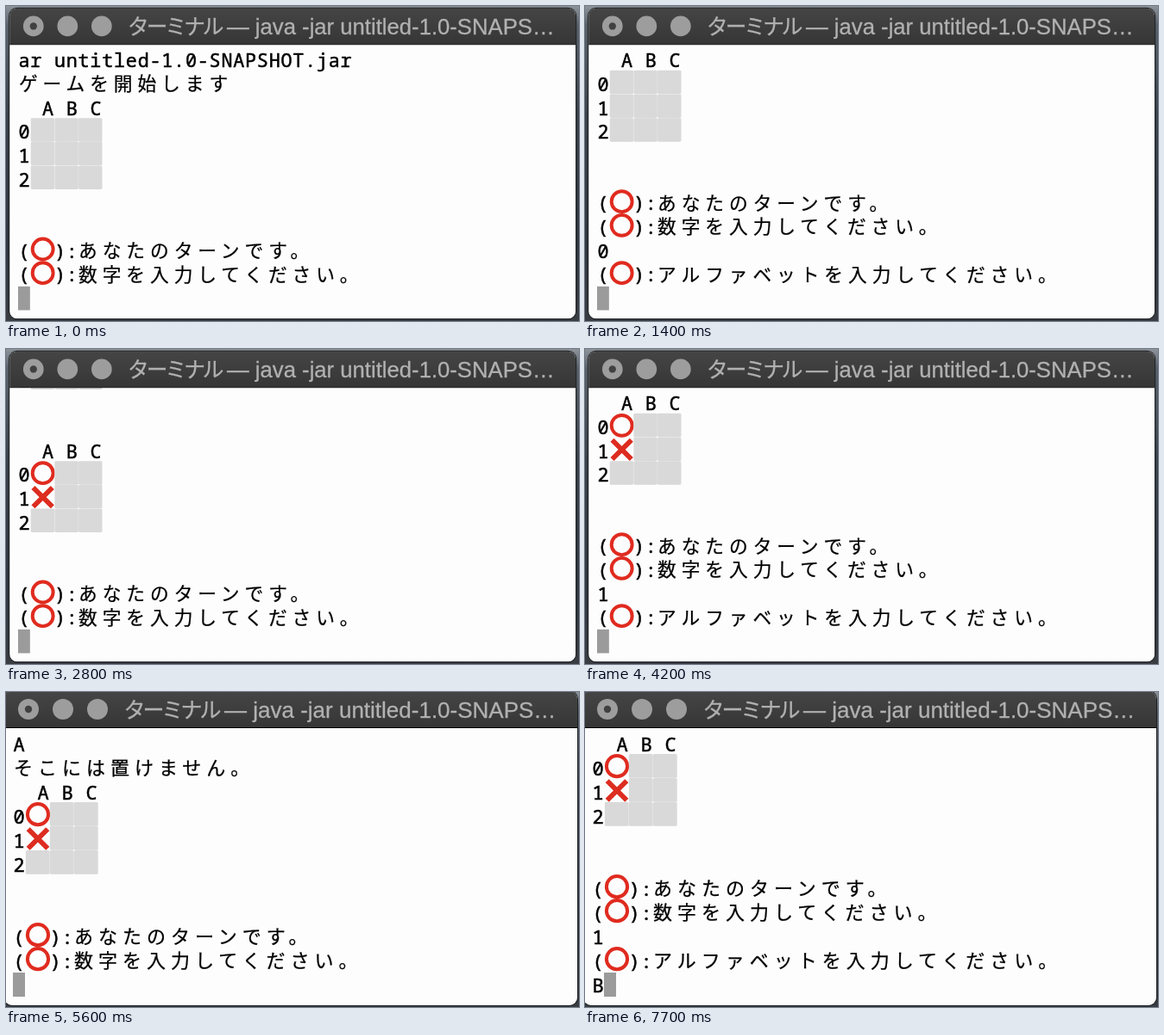
Write an HTML page that moves like this. It is 664 by 366 pixels and loops after 8 s.

```html
<!DOCTYPE html>
<html lang="ja">
<head>
<meta charset="utf-8">
<title>Terminal tic-tac-toe</title>
<style>
  html, body { margin: 0; width: 100%; height: 100%; overflow: hidden; }
  body { background: linear-gradient(#8d9399, #59616b 6%, #39414b 35%, #2f363f 75%, #393d42); }
  svg { display: block; width: 664px; height: 366px; }
  .mono { font: 500 22px "Noto Sans Mono", "DejaVu Sans Mono", monospace; letter-spacing: .8px; stroke: #000; stroke-width: .5px; }
  .kana { font: 400 22px "Noto Sans CJK JP", "Noto Sans CJK", sans-serif; letter-spacing: 6px; stroke: #000; stroke-width: .25px; }
  .title { font: 26px "Liberation Sans", Arial, sans-serif; fill: #b1b1b1; stroke: #b1b1b1; stroke-width: .3px; }
  .title .ja { font: 25px "Noto Sans CJK JP", "Noto Sans CJK", sans-serif; letter-spacing: -3px; }
</style>
</head>
<body>
<svg viewBox="0 0 664 366">
  <defs>
    <linearGradient id="bar" x2="0" y2="1">
      <stop stop-color="#454545"/>
      <stop offset="1" stop-color="#363636"/>
    </linearGradient>
    <rect id="shape" x="-2" y="-1" width="664" height="365" rx="9"/>
    <clipPath id="frame"><use href="#shape"/></clipPath>
    <rect id="empty" x=".9" y="-2" width="27.8" height="27.8" rx="1.5" fill="#d9d9d9"/>
    <circle id="ring" cx="15" cy="12.2" r="12.1" fill="none" stroke="#e02b1f" stroke-width="4"/>
    <path id="cross" d="M3.7 1.2 26.3 23.8M26.3 1.2 3.7 23.8" stroke="#dd2c20" stroke-width="5.8"/>
    <rect id="cursor" width="14" height="28" fill="#9b9b9b"/>
  </defs>
  <g id="window">
    <use href="#shape" fill="none" stroke="#1c1f22" stroke-width="2"/>
    <g clip-path="url(#frame)">
      <rect x="-2" y="-1" width="664" height="365" fill="#fdfdfd"/>
      <g id="screen"></g>
      <rect x="-2" y="-1" width="664" height="42" fill="url(#bar)"/>
      <rect x="-2" y="41" width="664" height="1"/>
      <g fill="#9d9d9d">
        <circle cx="26" cy="20" r="12"/>
        <circle cx="66" cy="20" r="12"/>
        <circle cx="106" cy="20" r="12"/>
      </g>
      <circle cx="26" cy="20" r="4.2" fill="#414141"/>
      <text class="title" y="30"><tspan class="ja" x="136.5">ターミナル</tspan><tspan x="253">— java -jar untitled-1.0-SNAPS…</tspan></text>
    </g>
  </g>
</svg>
<script>
const NS = 'http://www.w3.org/2000/svg';
const CELL = 14, ROW = 28, LEFT = 8, LAST_TOP = 326, STEP = 700, LOOP = 8000;
const ICONS = { '□': 'empty', '○': 'ring', '×': 'cross', '█': 'cursor' };
const view = document.getElementById('window');
const rows = document.getElementById('screen');

const board = (a, b, c) => ['  A B C', '0' + a, '1' + b, '2' + c, '', ''];
const fresh = board('□□□', '□□□', '□□□');
const played = board('○□□', '×□□', '□□□');
const askRow = ['(○):あなたのターンです。', '(○):数字を入力してください。'];
const askCol = '(○):アルファベットを入力してください。';

const rowInput = (head, typed = '') => [...head, ...askRow, typed + '█'];
const colInput = (grid, row, typed = '') => [...grid, ...askRow, row, askCol, typed + '█'];

const intro = ['ar untitled-1.0-SNAPSHOT.jar', 'ゲームを開始します', ...fresh];
const nextTurn = ['2□□□', '', '', ...played];
const refused = ['A', 'そこには置けません。', ...played];

const scenes = [
  rowInput(intro), rowInput(intro, '0'),
  colInput(fresh, '0'), colInput(fresh, '0', 'A'),
  rowInput(nextTurn), rowInput(nextTurn, '1'),
  colInput(played, '1'), colInput(played, '1', 'A'),
  rowInput(refused), rowInput(refused, '1'),
  colInput(played, '1'), colInput(played, '1', 'B')
];

function add(parent, tag, attrs, text = '') {
  const el = document.createElementNS(NS, tag);
  for (const key in attrs) el.setAttribute(key, attrs[key]);
  el.textContent = text;
  parent.append(el);
  return el;
}

// Wide characters take two cells, ASCII and the cursor take one.
function drawLine(group, line, top) {
  let x = LEFT;
  for (const run of line.match(/ +|[!-~]+|[□○×█]|[^ -~□○×█]+/g) || []) {
    const ascii = /^[ -~]/.test(run);
    const icon = ICONS[run];
    if (icon) add(group, 'use', { href: '#' + icon, x, y: top });
    else if (ascii) add(group, 'text', { class: 'mono', x: x + .4, y: top + 22.5 }, run);
    else add(group, 'text', { class: 'kana', x: x + .9, y: top + 21.7 }, run);
    x += run.length * CELL * (ascii || icon === 'cursor' ? 1 : 2);
  }
}

const groups = scenes.map(lines => {
  const group = add(rows, 'g', {});
  lines.forEach((line, i) => drawLine(group, line, LAST_TOP - ROW * (lines.length - 1 - i)));
  return group;
});

const start = performance.now();
let shown = -1;

function tick() {
  const index = Math.floor((performance.now() - start) % LOOP / STEP);
  if (index !== shown) {
    shown = index;
    groups.forEach((g, i) => g.style.display = i === index ? '' : 'none');
    // The view is slightly smaller until the second column entry.
    view.setAttribute('transform', index < 7 ? 'translate(6.1 3.7) scale(.988)' : '');
  }
  requestAnimationFrame(tick);
}
tick();
</script>
</body>
</html>
```
